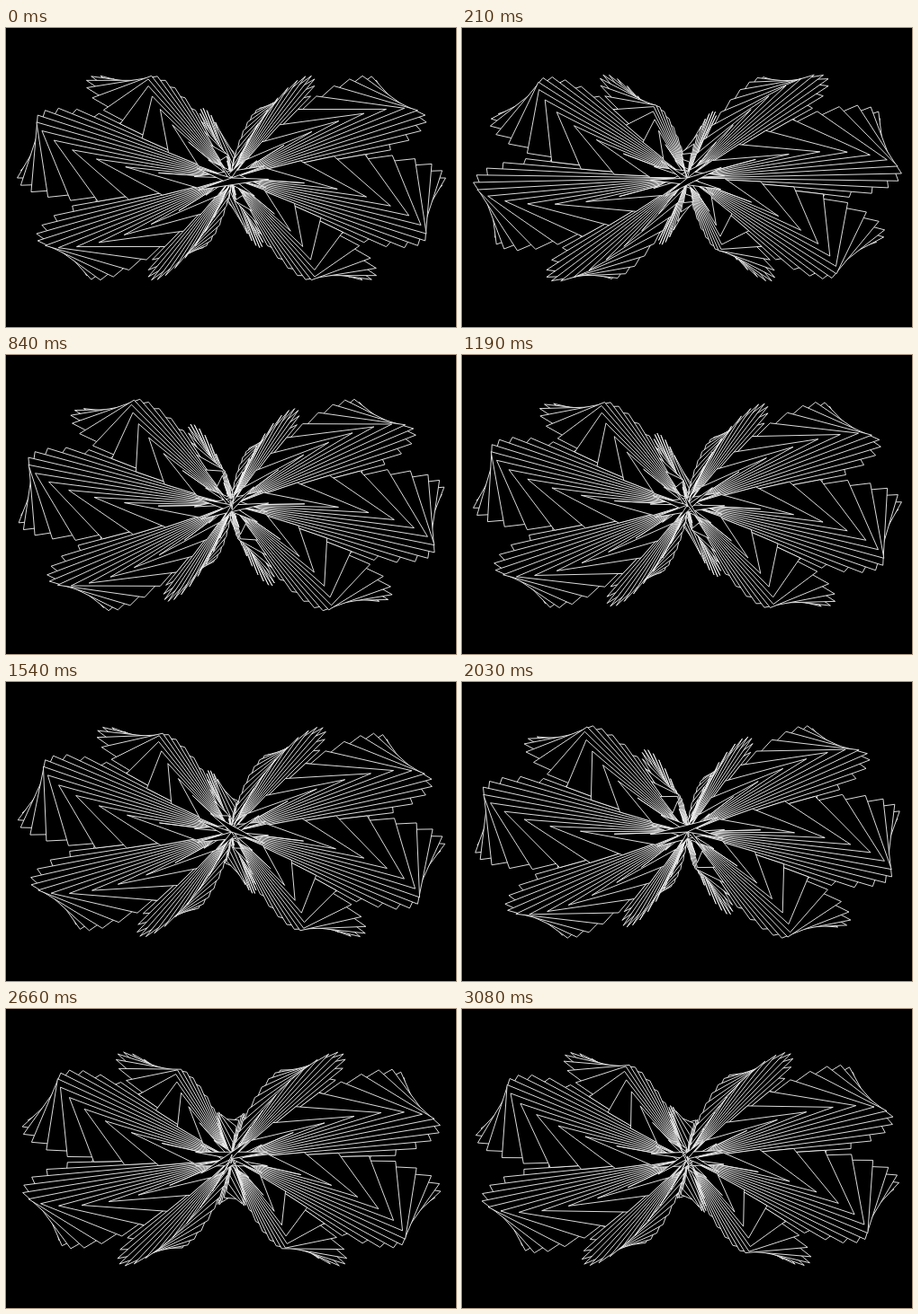
Recreate the animation shown at these times as an HTML page with a canvas. Size 500 by 333 pixels, loop 3.15 s.

```html
<!DOCTYPE html>
<html>
<head>
<meta charset="utf-8">
<style>
  html, body { margin: 0; width: 100%; height: 100%; overflow: hidden; background: #000; }
  canvas { display: block; }
</style>
</head>
<body>
<canvas id="stage" width="500" height="333"></canvas>
<script>
const ctx = document.getElementById('stage').getContext('2d');
const STEP = 70, STEPS = 45;
const RADIUS = 238;
const ARMS = 10, ARM = 360 / ARMS;
const TURN = 8 * ARM / STEPS;  // degrees per step
const LAG = 4;                 // how far the second corner runs ahead
const rad = deg => deg * Math.PI / 180;

// A corner swells and shrinks along its lobe; cos(angle) pinches the whole into two circles.
function corner(angle, offset) {
  const a = rad(angle + offset);
  const r = RADIUS * Math.cos(rad(5 * offset)) * Math.abs(Math.cos(a));
  return [r * Math.cos(a), -r * Math.sin(a)];
}

function wedge(angle, offset) {
  ctx.beginPath();
  ctx.moveTo(0, 0);
  ctx.lineTo(...corner(angle, offset));
  ctx.lineTo(...corner(angle + ARM / 2, offset + LAG));
  ctx.closePath();
  ctx.fill();
  ctx.stroke();
}

function draw(step) {
  ctx.setTransform(1, 0, 0, 1, 0, 0);
  ctx.fillStyle = '#000';
  ctx.fillRect(0, 0, 500, 333);
  ctx.translate(250.5, 167);
  ctx.strokeStyle = '#f4f4f4';
  ctx.lineWidth = 0.9;
  ctx.lineJoin = 'bevel';
  const base = 18 + step * TURN;
  for (let offset = -18; offset <= 16; offset += 2)
    for (let i = 0; i < ARMS; i++) wedge(base + i * ARM, offset);
}

const start = performance.now();
function tick() {
  const t = Math.max(0, performance.now() - start);
  draw(Math.floor(t / STEP) % STEPS);
  requestAnimationFrame(tick);
}
tick();
</script>
</body>
</html>
```
